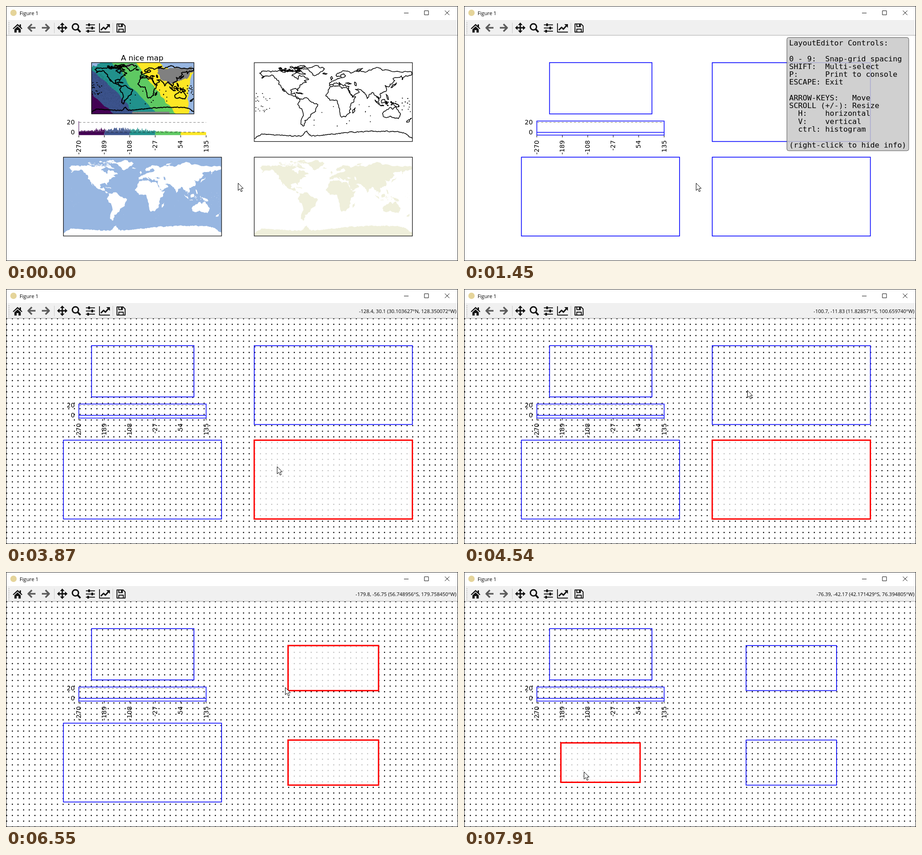
Animation, 996 px wide and 562 px high, one loop 8 s. Source, as an HTML page:

```html
<!DOCTYPE html>
<html lang="en">
<head>
<meta charset="utf-8">
<title>Figure 1</title>
<style>
  html, body { margin: 0; width: 100%; height: 100%; overflow: hidden; background: #fff; }
  svg { display: block; }
  text { white-space: pre; }
  .ui { font-family: "Open Sans", "Noto Sans", sans-serif; }
  .title { font: 16.67px "DejaVu Sans", sans-serif; text-anchor: middle; }
  .plot { font: 13.9px "DejaVu Sans", sans-serif; text-anchor: end; }
  .mono { font: 16.5px "DejaVu Sans Mono", monospace; }
  .key { font: bold 28.7px "Open Sans", sans-serif; fill: #fff; text-anchor: middle; }
  .coast { fill-rule: evenodd; vector-effect: non-scaling-stroke; stroke-linejoin: round; }
</style>
</head>
<body>
<svg id="stage" width="996" height="562" viewBox="0 0 996 562"></svg>
<script>
const LOOP = 8000, FRAME = 70;
const GRID_X = 12.425, GRID_Y = 12.4;
const VIRIDIS = ['#440154', '#3b528b', '#21918c', '#5ec962', '#fde725'];
const tickX = i => 160.5 + 56.1 * i;

let seed = 7;
const random = () => (seed = (seed * 16807) % 2147483647) / 2147483647;
const spread = (a, b) => a + (b - a) * random();
const repeat = (n, f) => Array.from({ length: n }, (_, i) => f(i));

const parse = s => s.trim().split(/\s+/).map(p => p.split(',').map(Number));
const toPath = pts => 'M' + pts.map(p => p.map(v => v.toFixed(2)).join(' ')).join('L') + 'Z';

// Fractal midpoint displacement of a closed outline; long edges are not pushed further than short ones
function roughen(pts, amount, depth) {
  if (!depth) return pts;
  const out = [];
  pts.forEach((a, i) => {
    const b = pts[(i + 1) % pts.length], dx = b[0] - a[0], dy = b[1] - a[1];
    const k = spread(-amount, amount) * Math.min(1, 10 / (Math.hypot(dx, dy) || 1));
    out.push(a, [(a[0] + b[0]) / 2 - dy * k, (a[1] + b[1]) / 2 + dx * k]);
  });
  return roughen(out, amount, depth - 1);
}

let coast = '';
const addLand = (pts, depth) => coast += toPath(roughen(pts.map(([lon, lat]) => [lon, -lat]), 0.24, depth));
const land = s => addLand(parse(s), 3);

// A lens-shaped island stretched between two places
function island(lon0, lat0, lon1, lat1, width) {
  const x = (lon0 + lon1) / 2, y = (lat0 + lat1) / 2;
  const k = width / Math.hypot(lon1 - lon0, lat1 - lat0);
  const nx = (lat1 - lat0) * k, ny = (lon0 - lon1) * k;
  addLand([[lon0, lat0], [x + nx, y + ny], [lon1, lat1], [x - nx, y - ny]], 2);
}

function scatter(count, west, east, south, north, size) {
  for (let i = 0; i < count; i++) {
    const lon = spread(west, east), lat = spread(south, north), r = spread(0.4, 1) * size;
    island(lon - r, lat, lon + r, lat + spread(-r, r) * 0.6, r * 0.5);
  }
}

// North America
land(`-168,66 -156,71 -128,70 -95,71 -82,67 -94,60 -80,52 -78,61 -66,59 -56,52 -66,49 -61,46 -75,40 -76,35
  -81,31 -81,25 -84,30 -97,28 -96,19 -88,21 -84,10 -78,8 -95,16 -106,22 -114,31 -111,24 -124,40 -124,48
  -135,58 -150,60 -163,55 -158,59`);
// South America
land('-77,8 -62,10 -50,0 -35,-6 -40,-21 -48,-26 -57,-37 -65,-42 -69,-55 -74,-50 -71,-18 -81,-5');
// Greenland
land('-73,78 -35,83 -20,76 -43,60 -54,70');
// Eurasia
land(`-9,37 0,39 8,44 16,39 13,45 23,37 27,40 28,37 36,36 34,28 44,13 59,22 50,29 66,25 72,20 77,8 81,16
  90,22 97,15 103,2 100,13 106,9 107,20 119,24 121,31 118,38 127,35 129,41 140,49 136,54 155,60 157,51
  164,60 179,64 175,70 128,72 104,78 68,70 40,66 26,71 6,61 8,58 18,57 17,62 24,65 28,60 10,54 -2,48 -9,43`);
// Africa
land('-6,36 10,37 20,31 33,31 43,11 51,12 40,-4 40,-16 27,-34 18,-34 9,1 8,4 -8,4 -17,14 -10,30');
// Australia
land('114,-23 130,-12 136,-16 142,-11 153,-27 148,-38 138,-35 130,-32 115,-34');

island(28, 43, 41, 42, 2);      // Black Sea, cut out of Eurasia
island(49, 46, 52, 37, 2);      // Caspian Sea, likewise
island(-90, 77, -64, 82, 2.5);  // Ellesmere
island(-88, 73, -63, 64, 4);    // Baffin
island(-117, 71, -102, 70, 3);  // Victoria
island(-24, 65, -14, 65, 1.5);  // Iceland
island(-5, 50, -3, 58, 2.5);    // Britain
island(52, 71, 67, 77, 1.5);    // Novaya Zemlya
island(44, -25, 50, -13, 2.5);  // Madagascar
island(131, 33, 144, 44, 1.5);  // Japan
island(131, -1, 150, -10, 3);   // New Guinea
island(110, -2, 117, 6, 4);     // Borneo
island(95, 5, 106, -6, 1.5);    // Sumatra
island(106, -7, 115, -8, 0.8);  // Java
island(120, 18, 126, 6, 1.5);   // Philippines
island(167, -46, 178, -37, 1.5); // New Zealand
island(-85, 22, -69, 19, 0.8);  // Antilles

// Antarctica: a slow wave with the peninsula as a narrow peak, falling off at the date line
const bump = (x, width) => Math.exp(-((x / width) ** 2));
const iceEdge = lon => -72 + 5.5 * Math.sin((lon - 10) * Math.PI / 180)
  + 13 * bump(lon + 62, 5) - 11 * bump(180 - Math.abs(lon), 12) + spread(-1, 1);
addLand([...repeat(75, i => [i * 5 - 185, iceEdge(i * 5 - 185)]), [190, -99], [-190, -99]], 2);

scatter(26, -122, -68, 69, 80, 4);
scatter(14, 115, 135, -10, 4, 1.8);
scatter(22, -178, -142, -24, 20, 0.5);
scatter(16, 140, 178, -22, 10, 0.8);
scatter(14, -60, 90, -55, -5, 0.5);

const axes = {
  map: [188.5, 124.7, 225.7, 113.1],
  lines: [547, 124.9, 348.5, 173.7],
  ocean: [126.5, 333.2, 348.5, 173.7],
  land: [547, 333.2, 348.5, 173.7],
};
const axesNames = Object.keys(axes);
const attrs = o => Object.entries(o).map(([k, v]) => `${k}="${v}"`).join(' ');
const rect = (x, y, width, height, more) => `<rect ${attrs({ x, y, width, height, ...more })}/>`;
const path = (d, more) => `<path ${attrs({ d, ...more })}/>`;
const text = (x, y, s, more) => `<text ${attrs({ x, y, ...more })}>${s}</text>`;
const view = ([x, y, width, height], viewBox, body) =>
  `<svg ${attrs({ x, y, width, height, viewBox, preserveAspectRatio: 'none' })}>${body}</svg>`;

const frame = box => rect(...box, { fill: 'none', stroke: '#000', 'stroke-width': 1.2 });
const worldMap = (box, fill, stroke, width) =>
  view(box, '-180 -90 360 180', path(coast, { class: 'coast', fill, stroke, 'stroke-width': width })) + frame(box);

function dataMap(box) {
  const zone = (fill, pts) => path(toPath(roughen(pts, 0.35, 4)), { fill });
  const band = i => {
    const x = 125 + 54 * i, slope = 1 - 0.07 * i;
    return zone(VIRIDIS[i], [[x, 125], [x + 115 * slope, 240], [100, 260], [100, 110], [x, 110]]);
  };
  const specks = repeat(700, () => {
    const y = spread(150, 238);
    return `M${spread(188, 60 + y).toFixed(1)} ${y.toFixed(1)}l1 ${spread(-1, 1).toFixed(1)}`;
  }).join('');
  return view(box, box.join(' '), rect(...box, { fill: '#97b6e1' })
    + zone(VIRIDIS[4], parse('250,110 336,110 345,135 414,146 398,250 250,250'))
    + [3, 2, 1, 0].map(band).join('')
    + zone('#97b6e1', parse('180,120 208,120 200,132 180,140'))
    + zone('#808080', parse('334,134 410,133 413,145 374,170 339,163'))
    + zone('#808080', parse('262,130 285,127 268,138'))
    + rect(278, 233, 82, 6, { fill: '#808080' })
    + path(specks, { stroke: '#123', 'stroke-width': 0.6, opacity: 0.35 })) + worldMap(box, 'none', '#000', 2);
}

function histogram() {
  const bars = repeat(160, i => {
    const x = 160.5 + 1.4 * i;
    const h = (2.5 + 8.5 * bump(x - 250, 60)) * spread(0.4, 1) * (random() > 0.9 ? 1.5 : 1);
    return rect(x.toFixed(1), (278.5 - h).toFixed(1), 1.4, h.toFixed(1), { fill: VIRIDIS[Math.floor(i / 40.1)] });
  });
  return VIRIDIS.map((fill, i) => rect(tickX(i), 278, 56.1, 6.5, { fill })).join('') + bars.join('')
    + path('M160.5 254V284', { stroke: VIRIDIS[0] })
    + path('M161 278H441', { stroke: '#222', 'stroke-dasharray': '6 4', opacity: 0.8 });
}

function plotLabels() {
  const ticks = repeat(6, i => path(`M${tickX(i)} 285v4.5`, { stroke: '#000', 'stroke-width': 1.1 })
    + text(0, 0, 81 * i - 270, { transform: `translate(${tickX(i) + 4.5} 296) rotate(-90)` }));
  return `<g class="plot">${ticks.join('')}${text(151.5, 261, 20)}${text(151.5, 283, 0)}`
    + path('M161 256.5H441', { stroke: '#808080', 'stroke-dasharray': '5 4' }) + '</g>';
}

function windowChrome() {
  const line = (d, width, stroke = '#111') =>
    path(d, { fill: 'none', stroke, 'stroke-width': width, 'stroke-linejoin': 'round' });
  const solid = d => path(d, { fill: '#111' });
  const arrow = (x, dir) => line(`M${x - 8 * dir} 48H${x + 8 * dir}M${x} 40l${8 * dir} 8l${-8 * dir} 8`, 3.6, '#5c5c5c');
  return rect(0, 0, 996, 31, { fill: '#fff' }) + rect(0, 31, 996, 33.5, { fill: '#f0f0f0' })
    + path('M0 64.5H996', { stroke: '#a8a8a8' })
    + '<circle cx="16.5" cy="15" r="7" fill="#e5d49a"/>'
    + text(30, 20, 'Figure 1', { class: 'ui', 'font-size': 11.2 })
    + line('M877 15.5h10M922 10.5h9v9h-9zM967 10l10 10M977 10l-10 10', 1)
    + path('M6.5 36V61', { stroke: '#aaa', 'stroke-width': 1.5, 'stroke-dasharray': '1.5 2.5' })
    + path('M106.5 37V60M235.5 37V60', { stroke: '#c8c8c8' })
    + solid('M15 49.5L25.5 39.5L30 43.5V40.5H33V46.5L36 49.5L34.5 51L25.5 43L16.5 51Z'
      + 'M18.5 51.5L25.5 45L32.5 51.5V58.5H27.5V53H23.5V58.5H18.5Z')
    + arrow(57, -1) + arrow(87, 1)
    + repeat(4, i => `<g transform="translate(124 48) rotate(${90 * i})">${solid('M0-11.5l5 5.5h-3.6V0h-2.800V-6H-5z')}</g>`).join('')
    + '<circle cx="153" cy="46" r="6.8" fill="none" stroke="#111" stroke-width="3"/>' + line('M158 51l6 6.5', 4)
    + repeat(3, i => line(`M176 ${41.5 + 7 * i}h20`, 2)).join('')
    + solid('M181 38.5h4v6h-4zM188 45.5h4v6h-4zM179 52.5h4v6h-4z')
    + line('M206 38V57.5H229', 1.8) + line('M209 53l6-6 4 4 8-9', 3) + solid('M221 40h8v8z')
    + line('M244.5 39.5H258L262.5 44V57.5H244.5Z', 2)
    + line('M248.5 57V51H258.5V57M248.5 40V45.5H256.5V40', 2) + solid('M253.5 40h3v5h-3z');
}

function snapGrid() {
  const dots = repeat(81, i => repeat(41, j =>
    `M${(1.6 + GRID_X * i).toFixed(2)} ${(561.5 - GRID_Y * j).toFixed(2)}h0`).join(''));
  return path(dots.join(''), { stroke: '#000', 'stroke-width': 2.7, 'stroke-linecap': 'round' });
}

function infoBox() {
  const rows = ['LayoutEditor Controls:', '', '0 - 9:  Snap-grid spacing', 'SHIFT:  Multi-select',
    'P:      Print to console', 'ESCAPE: Exit', '', 'ARROW-KEYS:   Move', 'SCROLL (+/-): Resize',
    '  H:    horizontal', '  V:    vertical', '  ctrl: histogram', '', '(right-click to hide info)'];
  return rect(711.5, 69.5, 268.5, 249.5, { rx: 4, fill: '#c8c8c8', 'fill-opacity': 0.85, stroke: '#555' })
    + rows.map((s, i) => text(716.5, 87 + 17.27 * i, s, { class: 'mono' })).join('');
}

document.getElementById('stage').innerHTML = `
  <clipPath id="canvas"><rect x="1" y="65" width="994" height="496"/></clipPath>
  <rect width="996" height="562" fill="#fff"/>
  <g id="figure">
    ${text(300, 120, 'A nice map', { class: 'title' })}
    ${dataMap(axes.map)}
    ${worldMap(axes.lines, 'none', '#000', 1.5)}
    ${rect(...axes.ocean, { fill: '#97b6e1' })}${worldMap(axes.ocean, '#fff', 'none', 0)}
    ${worldMap(axes.land, '#efefdb', 'none', 0)}
    ${histogram()}
  </g>
  ${plotLabels()}
  <g id="grid" clip-path="url(#canvas)">${snapGrid()}</g>
  <g id="editor">
    ${path('M160.5 253.5H441V284.5H160.5ZM160.5 278.5H441', { fill: 'none', stroke: '#00f', 'stroke-width': 1.5 })}
    ${axesNames.map(name => `<rect id="box-${name}"/>`).join('')}
  </g>
  <g id="info">${infoBox()}</g>
  ${windowChrome()}
  ${text(992.5, 52.5, '', { id: 'coords', class: 'ui', 'font-size': 11, 'text-anchor': 'end' })}
  <rect x=".5" y=".5" width="995" height="561" fill="none" stroke="#2b2b2b"/>
  <g id="key"><rect id="keyBox" y="520" height="42"/><text id="keyText" class="key" x="498.5" y="552"/></g>
  <path id="cursor" d="M.5 .5V16.5L4.2 13L7 19.2L9.7 18L7 12H11.8Z" fill="#fff" stroke="#000"/>`;

const el = id => document.getElementById(id);
const show = (id, on) => el(id).setAttribute('display', on ? 'inline' : 'none');
const set = (id, values) => Object.entries(values).forEach(([k, v]) => el(id).setAttribute(k, v));

// A burst of two wheel clicks per frame up to five, then single clicks
function wheelClicks(t, burst, ...singles) {
  const ticks = Math.max(0, Math.floor((t - burst) / FRAME) + 1);
  return Math.min(5, 2 * ticks) + singles.filter(s => t >= s).length;
}

function boxAt(name, t) {
  const [x, y, w, h] = axes[name];
  const n = name === 'map' ? 0 : name === 'ocean' ? wheelClicks(t, 7170, 7440, 7620) : wheelClicks(t, 5540, 6280);
  return [x + n * GRID_X, y + n * GRID_Y / 2, w - 2 * n * GRID_X, h - n * GRID_Y];
}
function placeIn(name, t, u, v) {
  const [x, y, w, h] = boxAt(name, t);
  return [x + u * w, y + v * h];
}

// Each leg starts where the previous one ended; `bend` holds Bézier handles
const legs = [
  { start: 2570, frames: 9, to: [597, 391], bend: [[143, 631], [535, 316]] },
  { start: 4400, frames: 3, to: placeIn('lines', 4400, 16.97 / 77, 19.8 / 35) },
  { start: 6550, frames: 6, to: [289, 434], bend: [[623.2, 324.9], [529.5, 139.3]] },
  { start: 7700, frames: 4, to: placeIn('ocean', 7700, 22.16 / 77, 25.7 / 35) },
];
function cursorAt(t, lag = 0) {
  let pos = [511, 390];
  for (const { start, frames, to, bend } of legs) {
    if (t < start) break;
    const u = Math.min(1, (Math.floor((t - start) / FRAME) + 1 - lag) / frames), v = 1 - u;
    const [p, q] = bend || [pos, to];
    pos = pos.map((a, i) => v ** 3 * a + 3 * v * v * u * p[i] + 3 * v * u * u * q[i] + u ** 3 * to[i]);
  }
  return pos;
}

function geoAt([x, y], t) {
  const box = axesNames.map(n => boxAt(n, t)).find(([bx, by, w, h]) => x > bx && x < bx + w && y > by && y < by + h);
  return box && [(x - box[0]) / box[2] * 360 - 180, 90 - (y - box[1]) / box[3] * 180];
}
// The readout follows the pointer and lags half a frame when it leaves an axes; only movement updates it
function coordText(t) {
  const last = legs.filter(leg => leg.start <= t).pop();
  if (!last) return '';
  const moved = Math.min(t, last.start + (last.frames - 1) * FRAME);
  const geo = geoAt(cursorAt(moved), moved) || geoAt(cursorAt(moved, 0.5), moved);
  if (!geo) return '';
  const [lon, lat] = geo;
  const short = v => Number(v.toPrecision(4));
  const degrees = (v, plus, minus) => Math.abs(v).toFixed(6) + '°' + (v < 0 ? minus : plus);
  return `${short(lon)}, ${short(lat)} (${degrees(lat, 'N', 'S')}, ${degrees(lon, 'E', 'W')})`;
}

function pressedKey(t) {
  if (t >= 70 && t < 520) return ['Alt', 50];
  if (t >= 520 && t < 1450) return ['Alt + L', 104];
  if (t >= 4940 && t < 5880) return ['Shift', 75];
  return ['', 0];
}

function isSelected(name, t) {
  if (t >= 6970) return name === 'ocean';
  return (name === 'land' && t >= 3330) || (name === 'lines' && t >= 5040);
}

function render(t) {
  const editing = t >= 620;
  show('figure', !editing);
  show('editor', editing);
  show('info', editing && t < 3730);
  show('grid', t >= 3330);

  axesNames.forEach(name => {
    const [x, y, width, height] = boxAt(name, t);
    const active = isSelected(name, t);
    set('box-' + name, { x, y, width, height, fill: active ? '#fff' : 'none', 'fill-opacity': 0.75,
      stroke: active ? '#f00' : '#00f', 'stroke-width': active ? 3 : 1.6 });
  });

  const [label, width] = pressedKey(t);
  show('key', label);
  set('keyBox', { x: 498.5 - width / 2, width });
  el('keyText').textContent = label;

  set('cursor', { transform: `translate(${cursorAt(t).map(Math.round).join(' ')})` });
  el('coords').textContent = coordText(t);
}

const start = performance.now();
function tick() {
  render((performance.now() - start) % LOOP);
  requestAnimationFrame(tick);
}
tick();
</script>
</body>
</html>
```
